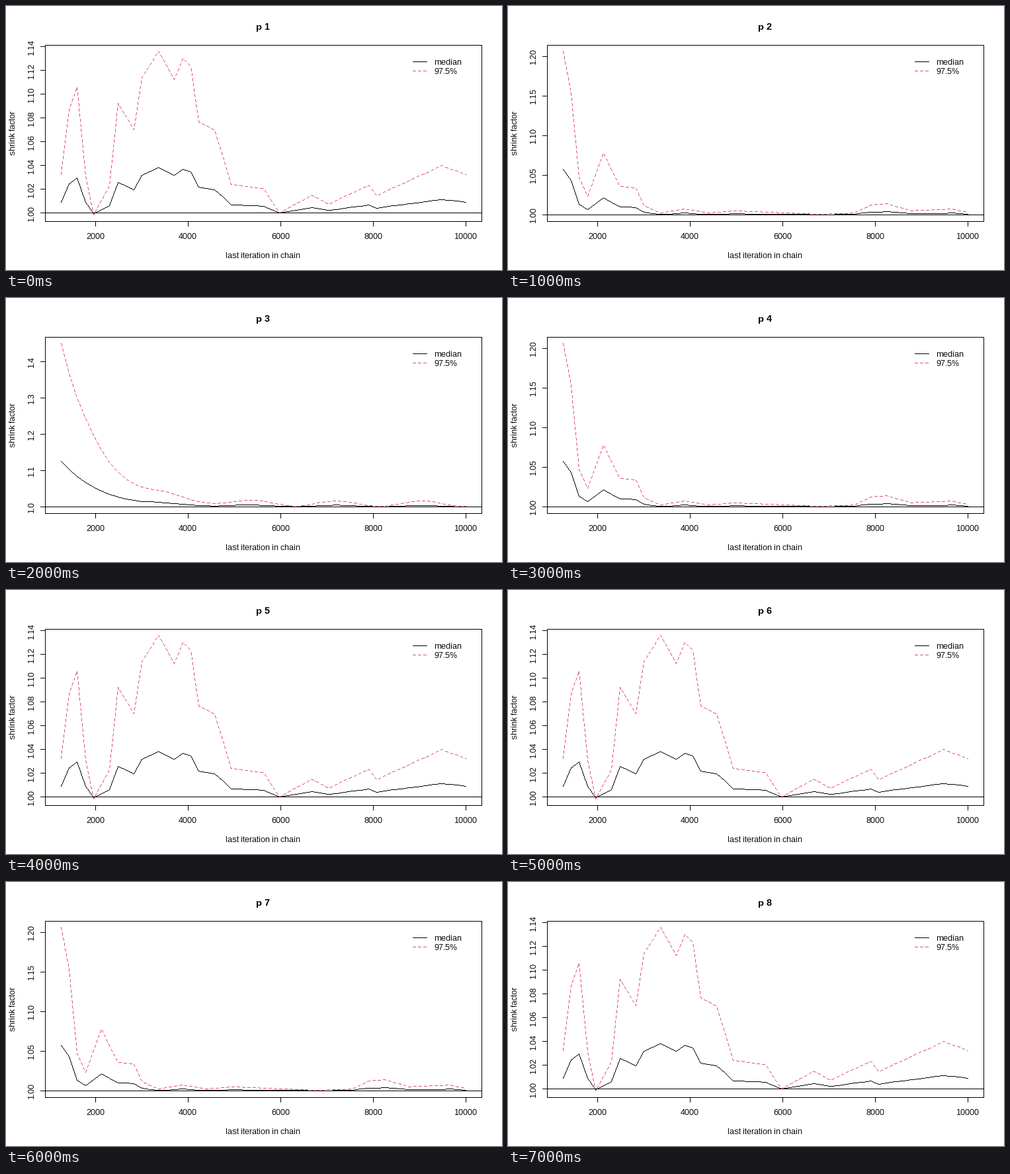
A matplotlib script for the animation above (8 s loop, 750x400 px).

```python
import numpy as np
import matplotlib.pyplot as plt
from matplotlib.animation import FuncAnimation
from matplotlib.collections import PolyCollection

W, H, DPI = 750, 400, 100
PX = 72 / DPI  # points per pixel
LEFT, RIGHT, TOP, BOTTOM = 59, 719, 59, 326
RED = "#DF536B"
DASH, GAP = 5, 3

plt.rcParams.update({
    "font.family": "Liberation Sans",
    "text.hinting": "native",  # whole-pixel glyph advances
    "text.hinting_factor": 1,
})

step = np.arange(51)
xs = np.floor(83.51 + 12.2356 * step)


def through(points):
    """Curve heights, in pixels above the 1.00 line, through {step: height}."""
    return np.interp(step, list(points), list(points.values()))


hump = through({0: 58, 1: 156, 2: 191, 3: 56, 4: -3, 6: 41, 7: 166, 9: 126,
                10: 205, 12: 245, 14: 202, 15: 234, 16: 222, 17: 138, 19: 125,
                21: 43, 25: 37, 27: 0, 31: 27, 33: 13, 38: 42, 39: 26,
                47: 72, 50: 58})
drop = through({0: 248, 1: 184, 2: 57, 3: 28, 5: 94, 7: 43, 9: 41, 10: 14,
                12: 3, 15: 9, 18: 3, 21: 6, 32: 1, 36: 3, 38: 15, 40: 17,
                43: 6, 48: 9, 50: 4})
decay = 243 * np.exp(-step / 4.5) + 5 + 4 * np.sin(0.6 * step)

# Each plot: row of the 1.00 line, tick value step, tick gap, tick count, curve.
HUMP = (313, 0.02, 36, 8, hump)
DROP = (316, 0.05, 60, 5, drop)
DECAY = (316, 0.1, 55, 5, decay)
PLOTS = [HUMP, DROP, DECAY, DROP, HUMP, HUMP, DROP, HUMP]

fig = plt.figure(figsize=(W / DPI, H / DPI), dpi=DPI, facecolor="white")
ax = fig.add_axes([0, 0, 1, 1])


def line(x, y, color="black", dashed=False):
    """Crisp polyline, one square per pixel along the longer axis."""
    points = np.column_stack([x, y]).astype(float)
    spans = [np.linspace(a, b, int(abs(b - a).max()) + 1)
             for a, b in zip(points, points[1:])]
    path = np.concatenate(spans)
    if dashed:
        run = np.hypot(*np.diff(path, axis=0, prepend=path[:1]).T).cumsum()
        path = path[run % (DASH + GAP) < DASH - 0.01]
    square = np.array([(0, 0), (1, 0), (1, 1), (0, 1)])
    cells = np.floor(path + 0.5)[:, None, :] + square
    ax.add_collection(PolyCollection(cells, facecolor=color, linewidth=0),
                      autolim=False)


def label(x, y, text, size=12, ha="center", **kw):
    ax.text(x, y, text, fontsize=size * PX, ha=ha, va="baseline",
            rotation_mode="anchor", **kw)


def draw(n):
    base, value, gap, count, upper = PLOTS[n]
    ax.cla()
    ax.set(xlim=(0, W), ylim=(H, 0))
    ax.axis("off")

    line(xs, base - np.round(0.28 * upper))
    line(xs, base - np.round(upper), RED, dashed=True)
    line([LEFT, RIGHT], [base, base])
    line([LEFT, RIGHT, RIGHT, LEFT, LEFT], [TOP, TOP, BOTTOM, BOTTOM, TOP])

    for k in range(1, 6):
        x = 140 * k - 5
        line([x, x], [BOTTOM, BOTTOM + 7])
        label(x, 353, str(2000 * k))
    digits = 1 if value == 0.1 else 2
    for k in range(count):
        y = base - gap * k
        line([LEFT - 7, LEFT], [y, y])
        label(42, y + 0.5, f"{1 + value * k:.{digits}f}", rotation=90)

    label(389, 36, f"p {n + 1}", 14.4, weight="bold")
    label(388.5, 382, "last iteration in chain")
    label(14, 192, "shrink factor", rotation=90)

    line([615, 636], [84, 84])
    line([615, 636], [98, 98], RED, dashed=True)
    label(647, 89, "median", ha="left")
    label(647, 103, "97.5%", ha="left")


anim = FuncAnimation(fig, draw, frames=len(PLOTS), interval=1000,
                     repeat=True, repeat_delay=0)
plt.show()
```
